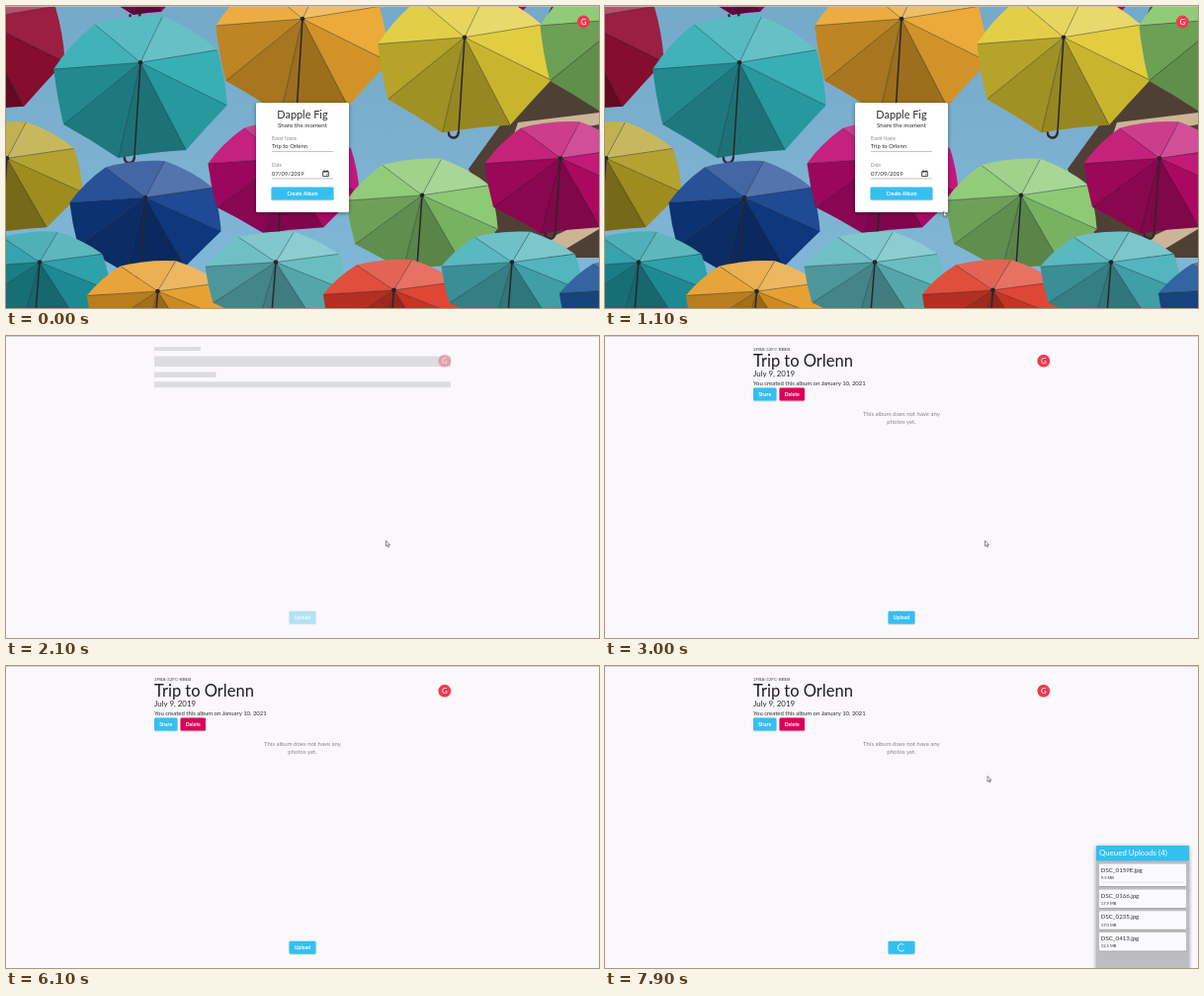
These frames come from a looping animation (600x306 px, 8000 ms). An HTML page:

```html
<!DOCTYPE html>
<html lang="en">
<head>
<meta charset="utf-8">
<title>Photo album</title>
<style>
  html, body { margin: 0; width: 100%; height: 100%; overflow: hidden; background: #faf8fb; }
  svg { display: block; width: 600px; height: 306px; font-family: Lato, "Open Sans", sans-serif; }
</style>
</head>
<body>
<svg id="stage" viewBox="0 0 600 306" xmlns="http://www.w3.org/2000/svg"></svg>
<script>
const LOOP = 8000, BLUE = '#34bff0', INK = '#2e2c30', PAPER = '#faf8fb', GREY = '#858388';
const PAGE_AT = 2000, CONTENT_AT = 2500, LEAVE_AT = 5400, QUEUE_AT = 7400;
const ALBUM = 'Trip to Orlenn';

const rect = (x, y, w, h, fill, extra = '') =>
  `<rect x="${x}" y="${y}" width="${w}" height="${h}" fill="${fill}" ${extra}/>`;
const text = (x, y, size, str, fill = INK, extra = '') =>
  `<text x="${x}" y="${y}" font-size="${size}" fill="${fill}" ${extra}>${str}</text>`;
const centred = (x, y, size, str, fill, extra = '') =>
  text(x, y, size, str, fill, `text-anchor="middle" ${extra}`);
const group = (id, body) => `<g id="${id}">${body}</g>`;
const button = (x, y, w, fill, label, id = '') =>
  rect(x, y, w, 13, fill, 'rx="1.3" filter="url(#soft)"') +
  centred(x + w / 2, y + 8.3, 5.1, label, '#fff', `font-weight="700" id="${id}"`);
const avatar = (x, y) =>
  `<circle cx="${x}" cy="${y}" r="6.4" fill="#ee3a50"/>` + centred(x, y + 2.8, 7.8, 'G', '#fff');
const spinner = (id, x, y) =>
  `<circle id="${id}" cx="${x}" cy="${y}" r="3.7" fill="none" stroke="#fff" stroke-width=".8" stroke-dasharray="17 6.25"/>`;

// An open umbrella from below: eight panels around a raised hub, light above and shade below.
function umbrella(color, cx, cy, rx, ry) {
  const hub = [cx, cy - ry * .35], end = [cx - rx * .07, cy + ry];
  const at = (angle, k) => [cx + rx * k * Math.cos(angle), cy + ry * k * Math.sin(angle)];
  let panels = '', ribs = '';
  for (let i = 0; i < 8; i++) {
    const from = .25 + i * Math.PI / 4, mid = from + Math.PI / 8, to = from + Math.PI / 4;
    const shade = .3 * Math.sin(mid - .3) + (i % 2) * .06;
    const d = `M${hub}L${at(from, 1.04)}Q${at(mid, .99 - .06 * Math.sin(mid))} ${at(to, 1.04)}Z`;
    panels += `<path d="${d}" fill="${color}"/>` +
      `<path d="${d}" fill="${shade > 0 ? '#000' : '#fff'}" opacity="${Math.abs(shade)}"/>`;
    ribs += `M${hub}L${at(from, 1.03)}`;
  }
  return panels + `<path d="${ribs}" stroke="#171820" stroke-width=".6" opacity=".6"/>` +
    `<path d="M${hub}L${end}" stroke="#29262b" stroke-width="1.5"/>` +
    `<path d="M${end}q-1 6 -6 5.500q-4 -1 -4 -5" stroke="#3a2530" stroke-width="2.400" fill="none" stroke-linecap="round"/>` +
    `<circle cx="${hub[0]}" cy="${hub[1]}" r="2.3" fill="#24252b"/>`;
}

// A line of evenly hung umbrellas; every second one sags, less and less to the right.
const row = ({ x, y, step, r, flat, sag, decay }, colors) => colors.split(' ').map((color, i) =>
  umbrella(color, x + i * step, y + (i % 2) * sag * decay ** i, r, r * flat)).join('');

const photo = rect(0, 0, 600, 306, 'url(#sky)') +
  '<path d="M552 0H600V255H505L468 165L502 118Z" fill="#4f4036"/>' +
  '<path d="M518 118L600 108V120L512 136ZM548 236l52 -24v14l-40 24Z" fill="#cbb596"/>' +
  row({ x: 138, y: -20, step: 365, r: 36, flat: .8, sag: 0, decay: 1 }, '#8c0a58 #b0106c') +
  row({ x: -28, y: 38, step: 164, r: 87, flat: .82, sag: 68, decay: .65 },
    '#940f32 #2aa9b0 #e9a42b #e0c932 #85c568') +
  row({ x: 1, y: 174, step: 140, r: 76, flat: .74, sag: 41, decay: .97 },
    '#b09c22 #103d8c #bd0873 #86c66c #be0a6c') +
  row({ x: 34, y: 276, step: 119.5, r: 71, flat: .66, sag: 30, decay: .98 },
    '#209aa4 #e59a24 #5fb9be #dd3a26 #47b0b8 #1c5498');

const field = (y, label, value) =>
  text(269, y, 4.7, label, '#8b898d') + text(269, y + 8.2, 5.9, value) +
  rect(269, y + 11.4, 62, .5, '#8b898d');
const calendar = '<path d="M320.700 168H326.300V172.600H320.700ZM320.700 167.500H326.300M321.900 166.200V168M325.100 166.200V168M323.800 170.800H325.300" fill="none" stroke="#333" stroke-width=".9"/>';

const form = rect(253, 98, 94, 111, '#fff', 'rx="1.6" filter="url(#deep)"') +
  centred(300, 114.2, 10.9, 'Dapple Fig') +
  centred(300, 123.2, 6.2, 'Share the moment') +
  field(136, 'Event Name', ALBUM) + field(163.3, 'Date', '07/09/2019') + calendar +
  button(268.5, 183.5, 63, BLUE, 'Create Album', 'createLabel') +
  spinner('createSpin', 300, 190);

const bone = (y, w, h) => rect(150, y, w, h, '#dddcdf', 'rx=".6"');
const skeleton = bone(11, 47, 4) + bone(20.5, 300, 10.5) + bone(36.5, 62.5, 5.5) + bone(46.3, 300, 5.9);

const album = text(150, 14.7, 4.6, '2FBA-32FC-BBEB', '#444') +
  text(150, 30.5, 16.5, ALBUM, '#1f1d21') +
  text(150, 41.3, 7.9, 'July 9, 2019') +
  text(150, 50, 5.95, 'You created this album on January 10, 2021') +
  button(150, 52.5, 23.5, BLUE, 'Share') +
  button(176.5, 52.5, 25.5, '#dc0059', 'Delete') +
  centred(300, 80.5, 6, 'This album does not have any', GREY) +
  centred(300, 89, 6, 'photos yet.', GREY);

const queueItem = (y, h, name, size) =>
  rect(500, y, 88, h, '#fbfafc', 'rx="1" filter="url(#soft)"') +
  text(501.8, y + 8, 6.1, name) + text(501.8, y + 15.3, 4.1, size);
const waiting = { 'DSC_0166.jpg': '17.9 MB', 'DSC_0235.jpg': '17.0 MB', 'DSC_0413.jpg': '12.5 MB' };
const queue = rect(497, 182, 94, 130, '#bdbcbe', 'rx="1.5" filter="url(#deep)"') +
  rect(497, 182, 94, 15.5, BLUE, 'rx="1.2"') +
  text(500, 191.8, 7.9, 'Queued Uploads (4)', '#fff') +
  queueItem(200.5, 22.5, 'DSC_0159E.jpg', '9.5 MB') + rect(502, 218.8, 84, .7, '#d9d8da') +
  Object.entries(waiting).map(([name, size], i) => queueItem(226.5 + i * 21.7, 18.5, name, size)).join('');

const outline = 'fill="#fff" stroke="#333" stroke-width=".55" stroke-linejoin="round"';
const cursor = `<path id="arrow" d="M0 0V5.500L1.300 4.400L2.200 6.400L3.100 6L2.200 4.100H3.900Z" ${outline}/>` +
  `<path id="hand" d="M0 .5Q.6 -.5 1.200 .5V2.600L3.800 3.200Q4.400 3.500 4.200 4.600L3.600 6.800H.6L-1.500 4.200Q-1.300 3.300 0 4Z" ${outline}/>`;

const shadow = (id, dy, blur, alpha) =>
  `<filter id="${id}" x="-20%" y="-20%" width="140%" height="150%"><feDropShadow dx="0" dy="${dy}" stdDeviation="${blur}" flood-opacity="${alpha}"/></filter>`;

document.getElementById('stage').innerHTML =
  '<defs><linearGradient id="sky" x2="0" y2="1"><stop stop-color="#75a9ca"/><stop offset="1" stop-color="#82b8d7"/></linearGradient>' +
  shadow('soft', .5, .4, .25) + shadow('deep', 1, 2, .4) + '</defs>' +
  group('home', photo + form + avatar(584.3, 16)) +
  group('page', rect(0, 0, 600, 306, PAPER) + group('loading', skeleton) + group('album', album) +
    group('controls', avatar(443.8, 25.2) + button(286.5, 278.8, 27, BLUE, 'Upload', 'uploadLabel') +
      spinner('uploadSpin', 300, 285.3)) +
    group('queue', queue)) +
  rect(0, 0, 600, .8, '#c9c8ca') + group('cursor', cursor);

const ui = Object.fromEntries([...document.querySelectorAll('#stage [id]')].map(el => [el.id, el]));
const show = (el, on) => el.setAttribute('display', on ? 'inline' : 'none');
const clamp = v => Math.max(0, Math.min(1, v));
const ease = p => p * p * (3 - 2 * p);

const moves = [
  { at: 1000, lasts: 400, to: [303.5, 188] },
  { at: 1800, lasts: 300, to: [384.5, 207.5] },
  { at: 3300, lasts: 700, to: [309.8, 282.8] },
  { at: QUEUE_AT, lasts: 400, to: [387, 111.5] },
];
const pointer = t => moves.reduce(([x, y], { at, lasts, to }) => {
  const p = ease(clamp((t - at) / lasts));
  return [x + (to[0] - x) * p, y + (to[1] - y) * p];
}, [350, 212]);

function busy(label, spin, since, t) {
  show(label, t < since);
  show(spin, t >= since);
  const { cx, cy } = spin;
  spin.setAttribute('transform',
    `rotate(${(t - since) * 360 / 1400 - 90} ${cx.baseVal.value} ${cy.baseVal.value})`);
}

function draw(t) {
  const onPage = t >= PAGE_AT;
  show(ui.home, !onPage);
  show(ui.page, onPage);
  show(ui.loading, t < CONTENT_AT);
  show(ui.album, t >= CONTENT_AT);
  show(ui.queue, t >= QUEUE_AT);
  ui.controls.setAttribute('opacity', clamp((t - PAGE_AT + 10) / 300));
  busy(ui.createLabel, ui.createSpin, 1600, t);
  busy(ui.uploadLabel, ui.uploadSpin, QUEUE_AT, t);

  const [x, y] = pointer(t);
  const overButton = onPage ? y > 278 && x < 314 : x < 331 && y < 197;
  show(ui.cursor, t >= 1000 && t < LEAVE_AT || t >= QUEUE_AT);
  show(ui.hand, overButton);
  show(ui.arrow, !overButton);
  ui.cursor.setAttribute('transform', `translate(${x} ${y})`);
}

const start = performance.now();
function tick() {
  draw((performance.now() - start) % LOOP);
  requestAnimationFrame(tick);
}
tick();
</script>
</body>
</html>
```
